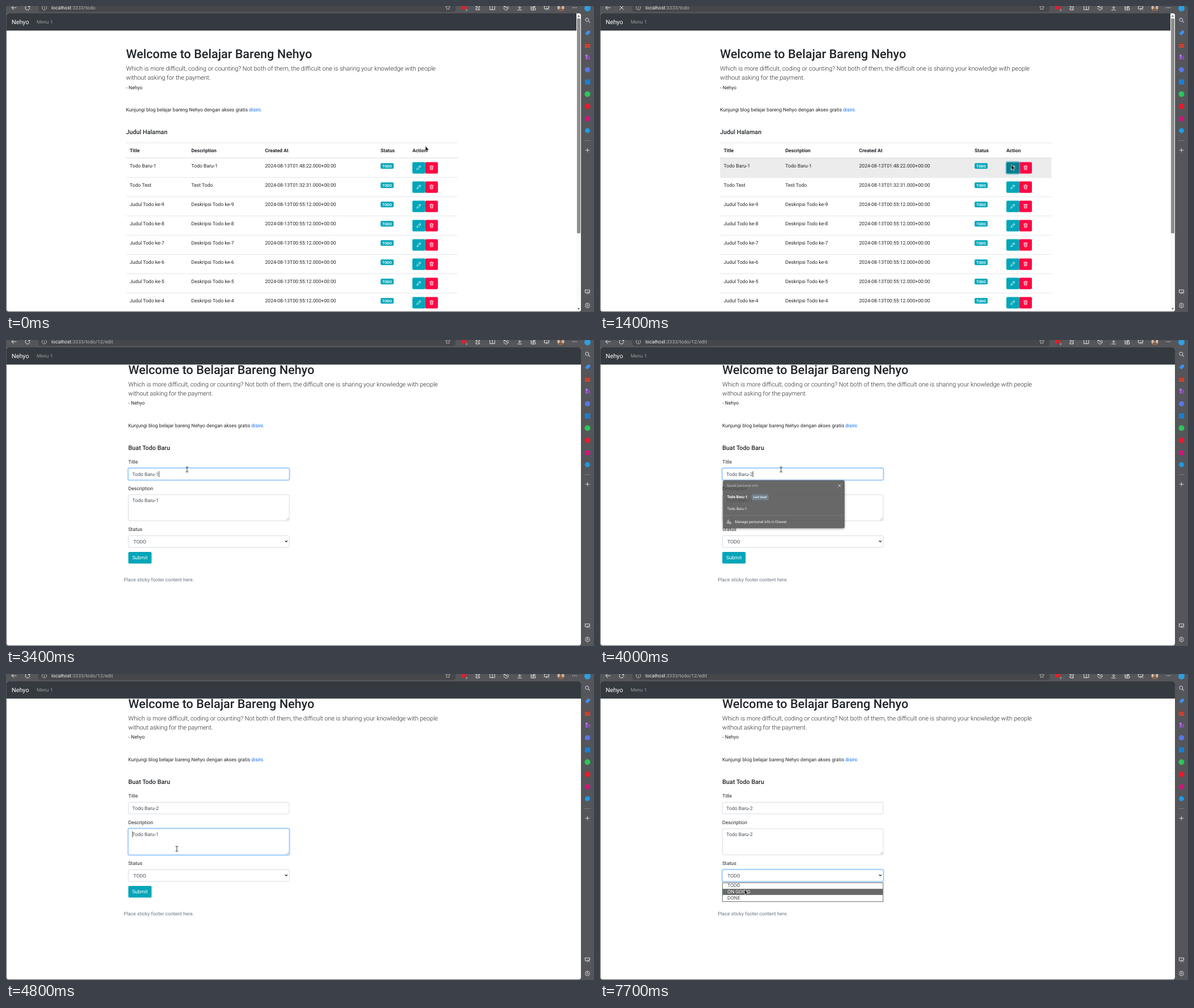
An HTML page for the animation above (8 s loop, 1036 by 540 pixels).

```html
<!DOCTYPE html>
<html lang="id">
<head>
<meta charset="utf-8">
<title>Todo</title>
<style>
  html, body { margin: 0; width: 100%; height: 100%; overflow: hidden; background: #55565a; }
  svg { display: block; width: 1036px; height: 540px; }
  text { font-family: Roboto, "Noto Sans", sans-serif; text-rendering: geometricPrecision; white-space: pre; }
</style>
</head>
<body>
<svg id="stage" viewBox="0 0 1036 540" xmlns="http://www.w3.org/2000/svg"></svg>
<script>
const LOOP = 8000;
const NAME = 'Nehyo';
const TEAL = '#03a5b9', RED = '#ff0844', INK = '#212529', FIELD = '#495057', CHROME = '#55565a';
const BODY = 8.64, LARGE = 10.8;

const rect = (x, y, w, h, fill, extra = '') =>
  `<rect x="${x}" y="${y}" width="${w}" height="${h}" fill="${fill}" ${extra}/>`;
const text = (x, y, content, size = BODY, fill = INK, weight = 400, extra = '') =>
  `<text x="${x}" y="${y}" font-size="${size}" fill="${fill}" font-weight="${weight}" ${extra}>${content}</text>`;
const dot = (x, y, r, fill) => `<circle cx="${x}" cy="${y}" r="${r}" fill="${fill}"/>`;
const icon = (x, y, d, color = '#e4e4e4', width = 1) =>
  `<path transform="translate(${x} ${y})" d="${d}" fill="none" stroke="${color}" stroke-width="${width}" stroke-linecap="round" stroke-linejoin="round"/>`;
const group = (id, content, extra = '') => `<g id="${id}" ${extra}>${content}</g>`;

const PENCIL = 'M-3.4 3.4L-2.6 .9L1.9 -3.6L3.6 -1.9L-.9 2.6ZM.8 -2.5L2.5 -.8';
const TRASH = 'M-3.1 -2.5H3.1M-1 -2.7V-3.6H1V-2.7M-2.5 -2.4L-2.1 3.6H2.1L2.5 -2.4M-.9 -.8V2.1M.9 -.8V2.1';
const SCREENSHOT = 'M-4 -3H4V1M-4 -3V2H0M-1 4L4 0M4 4L0 0';
const CLOSE = 'M-2.2 -2.2L2.2 2.2M2.2 -2.2L-2.2 2.2';

function toolbar() {
  return rect(57, -12, 735, 22.5, '#46474a', 'rx="4"')
    + icon(14, 3, 'M4 0H-4M-.5 -3.5L-4 0L-.5 3.5')
    + group('reload', icon(38, 3, 'M3.6 -1.7A4 4 0 1 0 4 .6M3.9 -4V-1.5H1.4'))
    + group('stop', icon(38, 3, 'M-3.3 -3.3L3.3 3.3M3.3 -3.3L-3.3 3.3'))
    + icon(67.5, 3, 'M0 -4A4 4 0 1 0 .01 -4M0 -.5V2M0 -2V-1.9', '#d0d0d0', .8)
    + `<text y="6" x="80" font-size="8.6" fill="#f2f2f2">localhost<tspan id="path" fill="#b4b4b6"></tspan></text>`
    + icon(778.5, 2.6, 'M0 -4L1.2 -1.3L4 -1L1.9 .9L2.5 3.8L0 2.3L-2.5 3.8L-1.9 .9L-4 -1L-1.2 -1.3Z', '#c4c4c4', .8)
    + rect(802, -2, 9, 8, '#e01e2d', 'rx="1"') + text(810, 9, '3', 5, '#eee')
    + icon(831, 3, 'M-3 3.5V1H-1.5A1.3 1.3 0 0 0 -1.5 -1.5H-3V-3H3.2V-.5H2A1.3 1.3 0 0 0 2 2H3.2V3.5Z')
    + icon(857, 3, 'M-4 -3.5H-.8L0 -2.7L.8 -3.5H4V3.5H.8L0 4L-.8 3.5H-4ZM0 -2.7V3.6')
    + icon(881, 3, 'M-3.4 -2A4 4 0 1 1 -4 .6M-3.8 -4V-1.6H-1.4M0 -2V.6H2')
    + icon(905, 3, 'M0 -4V1.5M-2.5 -.8L0 1.7L2.5 -.8M-3.5 4H3.5')
    + icon(929, 3, 'M-3.5 -3.5H0V4H-3.5ZM-3.5 .3H3.8V4H0M2 -4.5V-1M.2 -2.7H3.8')
    + icon(952.5, 3, SCREENSHOT)
    + dot(977.5, 3, 6, '#c8bdb4') + dot(977.5, 1.5, 2.2, '#8a5a3a')
    + `<path d="M973 7A4.7 4.2 0 0 1 982 7A6 6 0 0 1 973 7Z" fill="#8a5a3a"/>`
    + [-3, 0, 3].map(d => dot(1001.5 + d, 3, .8, '#e4e4e4')).join('')
    + dot(1024.5, 4, 5.5, '#2f9fe0');
}

function sidebar() {
  const x = 1024.5;
  return icon(x, 25, 'M-.7 -3.6A2.9 2.9 0 1 0 -.69 -3.6M1.5 1.4L4 4', '#c3c5dc', 1.1)
    + `<path d="M1020.5 48L1025 43.5H1029V47.5L1024 52Z" fill="#3d8ff0"/>`
    + rect(1020, 67, 9, 6.5, '#d9432f', 'rx="1"') + icon(x, 69, 'M-1.7 -2.2V-3.6H1.7V-2.2M-4 1H4', '#a92a20', .9)
    + dot(1023, 87.5, 2, '#b57be0') + rect(1021, 89, 4, 5.5, '#9a56cf') + dot(1027.3, 89.5, 1.7, '#8c49c2') + rect(1026, 91, 3, 3.5, '#8c49c2')
    + dot(x, 112.5, 4.6, '#5877ea')
    + rect(1020, 129.5, 9, 9, '#1480d8', 'rx="1"')
    + dot(x, 155.5, 5, '#2cc65a')
    + dot(x, 177, 4.8, '#f0172c')
    + dot(x, 199, 4.6, '#d3137c')
    + dot(x, 220, 4.4, '#1e9be6')
    + rect(1019, 237, 11, 1, '#77787b')
    + icon(x, 254.5, 'M-3.3 0H3.3M0 -3.3V3.3', '#d5d5d5')
    + icon(x, 504, SCREENSHOT)
    + icon(x, 528.5, 'M0 -1.4A1.4 1.4 0 1 0 .01 -1.4M-1 -4.2H1L1.4 -2.9L2.9 -3L3.9 -1.3L3 0L3.9 1.3L2.9 3L1.4 2.9L1 4.2H-1L-1.4 2.9L-2.9 3L-3.9 1.3L-3 0L-3.9 -1.3L-2.9 -3L-1.4 -2.9Z', '#dcdcdc', .9);
}

const intro = () => text(211.5, 92, `Welcome to Belajar Bareng ${NAME}`, 21.6, INK, 500)
  + text(211.5, 114, 'Which is more difficult, coding or counting? Not both of them, the difficult one is sharing your knowledge with people', LARGE, INK, 300)
  + text(211.5, 130.2, 'without asking for the payment.', LARGE, INK, 300)
  + text(211.5, 146.5, `- ${NAME}`)
  + text(211.5, 186, `Kunjungi blog belajar bareng ${NAME} dengan akses gratis <tspan fill="#0a6cff">disini.</tspan>`);

function tableRow(index, [title, description, time]) {
  const y = index * 34;
  const editId = index ? '' : 'id="edit"';
  return rect(211.5, 302 + y, 584, .8, '#dee2e6')
    + text(218, 285 + y, title) + text(326.5, 285 + y, description)
    + text(456.5, 285 + y, `2024-08-13T${time}.000+00:00`)
    + rect(660, 277.2 + y, 23, 10, TEAL, 'rx="2"')
    + text(671.5, 284.5 + y, 'TODO', 6.48, '#fff', 700, 'text-anchor="middle"')
    + rect(738.5, 275.4 + y, 22.5, 20.4, RED, 'rx="2"')
    + rect(716, 275.4 + y, 22.8, 20.4, TEAL, `rx="2" ${editId}`)
    + icon(727.4, 285.2 + y, PENCIL, '#fff', .8) + icon(749.8, 285.2 + y, TRASH, '#fff', .8);
}

function listPage() {
  const rows = [['Todo Baru-1', 'Todo Baru-1', '01:48:22'], ['Todo Test', 'Test Todo', '01:32:31']];
  for (let n = 9; n >= 4; n--) rows.push([`Judul Todo ke-${n}`, `Deskripsi Todo ke-${n}`, '00:55:12']);
  const heads = [[218, 'Title'], [326.5, 'Description'], [456.5, 'Created At'], [660, 'Status'], [716, 'Action']];
  return text(211.5, 226, 'Judul Halaman', LARGE, INK, 500)
    + rect(211.5, 241, 584, .8, '#dee2e6') + rect(211.5, 267.6, 584, 1.2, '#dee2e6')
    + heads.map(([x, label]) => text(x, 258, label, BODY, INK, 700)).join('')
    + rect(211.5, 268.5, 584, 33.8, '#000', 'id="rowHover" fill-opacity=".075"')
    + rows.map((row, i) => tableRow(i, row)).join('')
    + rect(715.2, 274.6, 24.4, 22, 'none', 'id="editRing" rx="2.5" stroke="#3ab0c3" stroke-opacity=".6" stroke-width="1.7"')
    + rect(1005, 13, 8, 526, '#fafafa') + rect(1006, 22, 6, 379, '#8d8d8d', 'rx="1"')
    + '<path d="M1007 19L1009 16L1011 19ZM1007 533L1009 536L1011 533Z" fill="#606060"/>'
    + group('linkHint', rect(1, 527, 122, 12, '#4a4a4a', 'rx="2"') + text(5, 535.5, 'localhost:3333/todo/12/edit', 6.5, '#e8e8e8'));
}

const field = (id, y, h) =>
  rect(214.7, y - .8, 285.1, h + 1.6, 'none', `id="${id}Ring" rx="3" stroke="#007bff" stroke-opacity=".3" stroke-width="1.7"`)
  + rect(215.5, y, 283.5, h, '#fff', `id="${id}Box" rx="2.2" stroke-width=".8"`);

const formPage = () => text(215.5, 193.5, 'Buat Todo Baru', LARGE, INK, 500)
  + text(215.5, 218.2, 'Title') + text(215.5, 264.8, 'Description') + text(215.5, 337.2, 'Status')
  + field('title', 226.4, 20.5) + field('note', 273, 46) + field('status', 345.4, 20.5)
  + text(222.5, 239.8, '', BODY, FIELD, 400, 'id="titleText"')
  + text(222.5, 285.8, '', BODY, FIELD, 400, 'id="noteText"')
  + icon(496, 316, 'M-2 2L2 -2M.5 2L2 .5', '#888', .6)
  + text(224.5, 358.6, 'TODO', BODY, FIELD)
  + icon(493.8, 355.4, 'M-1.9 -1L0 1L1.9 -1', '#222', 1.2)
  + rect(215.5, 374, 41, 20.6, TEAL, 'rx="2.2"')
  + text(236, 387.4, 'Submit', BODY, '#fff', 400, 'text-anchor="middle"')
  + text(207.5, 425.7, 'Place sticky footer content here.', BODY, '#6c757d')
  + rect(0, 0, .8, 10.5, '#222', 'id="caret"')
  + group('autofill', autofill()) + group('options', options());

const autofill = () => rect(216.5, 247.6, 214.5, 84.6, '#4c4c4c', 'rx="3" style="filter:drop-shadow(0 1.5px 2px #0006)"')
  + text(223.3, 259.2, 'Saved personal info', 6.3, '#b0b0b0')
  + icon(422, 257, CLOSE, '#e8e8e8', .8)
  + text(224, 279, 'Todo Baru-1', 6.5, '#fff', 700)
  + rect(267, 272, 30, 11, '#586a76', 'rx="2.5"')
  + text(282, 279.4, 'Last Used', 5.3, '#dcecf7', 700, 'text-anchor="middle"')
  + text(224, 300, 'Todo Baru-1', 6.5, '#f2f2f2')
  + rect(216.5, 309.5, 214.5, .6, '#686868')
  + icon(227, 321, 'M-1 -3.2A1.5 1.5 0 1 0 -.99 -3.2M-3.4 3V1.2H0M.8 .6H3.6V3.2H.8Z', '#eee', .8)
  + text(237.5, 323.2, 'Manage personal info in Drawer', 6.5, '#f2f2f2');

const options = () => rect(215.8, 368.3, 283, 33.4, '#fff', 'stroke="#5c5c5c" stroke-width=".9"')
  + rect(216.2, 0, 282.2, 10.8, '#686868', 'id="highlight"')
  + ['TODO', 'ON GOING', 'DONE'].map((label, i) =>
      text(224.5, 376.4 + i * 10.9, label, BODY, FIELD, 400, `id="option${i}"`)).join('');

document.getElementById('stage').innerHTML =
  '<defs><clipPath id="view"><rect x="1" y="13" width="1012" height="526" rx="4"/></clipPath></defs>'
  + rect(0, 0, 1036, 540, CHROME) + toolbar() + sidebar()
  + `<g clip-path="url(#view)">${rect(1, 13, 1012, 526, '#fff')}${group('intro', intro())}${group('listPage', listPage())}${group('formPage', formPage())}`
  + rect(1, 13, 1012, 30.4, '#343a40', 'id="navbar"')
  + text(10, 32.2, NAME, LARGE, '#fff') + text(54, 31.4, 'Menu 1', BODY, '#94989b') + '</g>'
  + group('arrow', '<path d="M0 0V9.4L2.1 7.5L3.5 10.8L4.9 10.2L3.5 7H6.3Z" fill="#111" stroke="#fff" stroke-width=".6"/>')
  + group('ibeam', icon(0, 0, 'M-2 -4.3H-.6L0 -3.9L.6 -4.3H2M0 -3.9V3.9M-2 4.3H-.6L0 3.9L.6 4.3H2', '#222', .9));

const ui = Object.fromEntries([...document.querySelectorAll('#stage [id]')].map(el => [el.id, el]));
const show = (el, visible) => el.setAttribute('display', visible ? 'inline' : 'none');
const place = (el, x, y) => el.setAttribute('transform', `translate(${x} ${y})`);

// Pointer stops: time, x, y
const POINTER = [
  [0, 739, 247], [300, 739, 247], [1100, 725, 280], [1400, 725, 280], [1900, 382, 231],
  [2000, 382, 231], [2200, 319, 228.5], [4400, 319, 228.5], [4700, 301, 308.5], [6100, 301, 308.5],
  [6400, 265, 362.5], [6600, 265, 362.5], [6700, 265, 355.5], [7200, 265, 355.5], [7300, 261, 362],
  [7400, 261, 362], [7500, 254.5, 380]
];
const ease = p => p * p * (3 - 2 * p);

function pointerAt(t) {
  const next = POINTER.findIndex(stop => stop[0] > t);
  if (next < 0) return POINTER[POINTER.length - 1].slice(1);
  const [t0, x0, y0] = POINTER[next - 1], [t1, x1, y1] = POINTER[next];
  const p = ease((t - t0) / (t1 - t0));
  return [x0 + (x1 - x0) * p, y0 + (y1 - y0) * p];
}

// Latest value whose start time has passed
const at = (t, steps) => steps.reduce((value, [start, next]) => t >= start ? next : value, null);

function focus(id, strength) {
  ui[id + 'Ring'].setAttribute('opacity', strength);
  ui[id + 'Box'].setAttribute('stroke', strength ? '#80bdff' : '#ced4da');
}

function render(time) {
  const t = Math.floor(time / 100) * 100;
  const editing = t >= 1500;
  const [x, y] = pointerAt(t);

  show(ui.listPage, !editing);
  show(ui.formPage, editing);
  place(ui.intro, editing ? 4 : 0, editing ? -32.4 : 0);
  ui.navbar.setAttribute('width', editing ? 1012 : 1004);
  ui.path.textContent = editing ? ':3333/todo/12/edit' : ':3333/todo';
  const loading = t >= 1300 && t < 1500;
  show(ui.stop, loading);
  show(ui.reload, !loading);

  const overEdit = !editing && y > 275.4 && x < 738.5;
  show(ui.rowHover, !editing && y > 268.5);
  ui.edit.setAttribute('fill', overEdit ? '#067f8e' : TEAL);
  show(ui.editRing, loading);
  show(ui.linkHint, overEdit && !loading);

  focus('title', at(t, [[0, 0], [2500, .75], [3400, 1], [4700, 0]]));
  focus('note', at(t, [[0, 0], [4700, .75], [4800, 1], [6400, .7], [6600, 0]]));
  focus('status', at(t, [[0, 0], [6600, .75], [6700, 1]]));
  ui.titleText.textContent = 'Todo Baru-' + at(t, [[0, '1'], [3500, ''], [4000, '2']]);
  ui.noteText.textContent = 'Todo Baru-' + at(t, [[0, '1'], [5600, ''], [5800, '2']]);

  const caretX = at(t, [[0, 0], [2500, 269.2], [3500, 264.4], [3800, 0], [4000, 269.2],
    [4700, 222.4], [5200, 269.2], [5600, 264.4], [5800, 269.2], [6400, 0]]);
  show(ui.caret, caretX > 0);
  place(ui.caret, caretX, t < 4700 ? 231.5 : 277.5);

  ui.autofill.setAttribute('opacity', at(t, [[0, 0], [3500, 1], [4000, .84], [4100, .35], [4200, 0]]));
  show(ui.options, t >= 7000);
  const picked = t >= 7700 ? 1 : 0;
  ui.highlight.setAttribute('y', 368.5 + picked * 10.6);
  for (let i = 0; i < 3; i++) ui['option' + i].setAttribute('fill', i === picked ? '#f4f4f4' : FIELD);

  const overText = editing && x < 499 && y < 320;
  show(ui.ibeam, overText);
  show(ui.arrow, !overText);
  place(overText ? ui.ibeam : ui.arrow, x, y);
}

let start;
function tick(now) {
  start ??= now;
  render((now - start) % LOOP);
  requestAnimationFrame(tick);
}
render(0);
requestAnimationFrame(tick);
</script>
</body>
</html>
```
